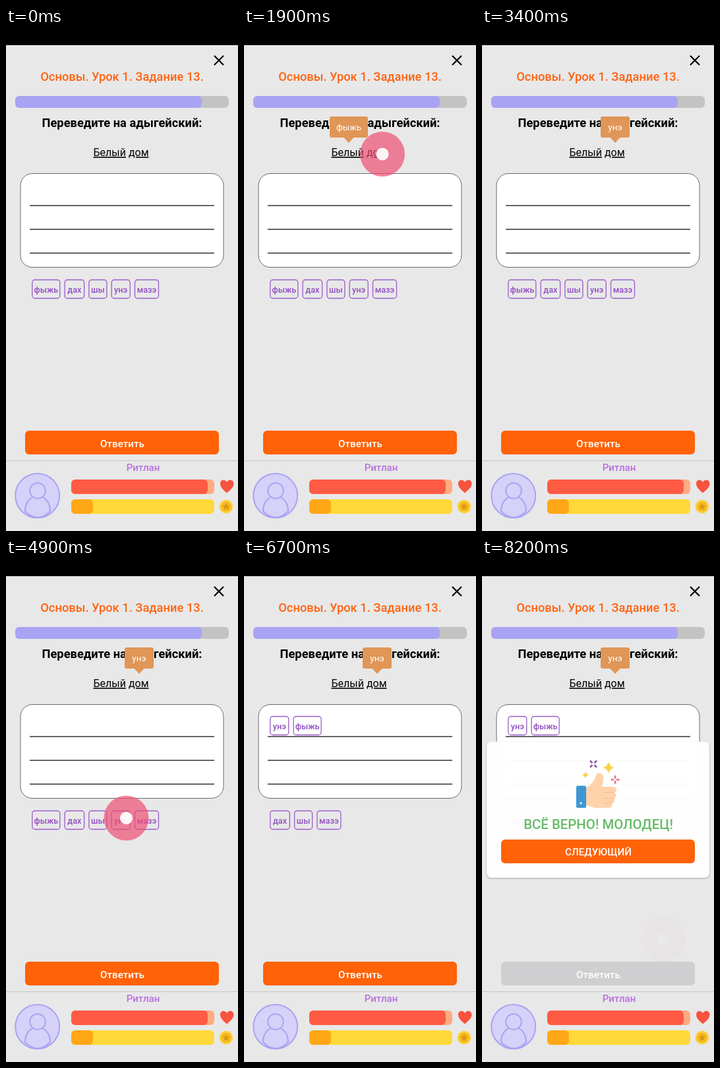
Recreate the animation shown at these times as an HTML page. Size 352x762 px, loop 8300 ms.

```html
<!DOCTYPE html>
<html lang="ru">
<head>
<meta charset="utf-8">
<title>Урок</title>
<style>
html, body { margin: 0; width: 100%; height: 100%; overflow: hidden; background: #e8e8e8; }
svg { display: block; width: 100vw; height: 100vh; }
text { font-family: Roboto, "Noto Sans", sans-serif; text-anchor: middle; font-weight: 500; }
.chip rect { fill: none; stroke: #9a5cc8; stroke-width: 1.3; }
.chip text { fill: #924fc4; font-size: 12.7px; }
.tip text { fill: #fff; font-size: 13.5px; font-weight: 400; }
</style>
</head>
<body>
<svg viewBox="0 0 352 762">
  <rect width="352" height="762" fill="#e8e8e8"/>
  <rect width="352" height="26"/>
  <path d="M316 42l14 14m0-14l-14 14" stroke="#000" stroke-width="2.2"/>
  <text x="176" y="80" font-size="18.3" fill="#ff6412">Основы. Урок 1. Задание 13.</text>
  <rect x="14" y="103" width="324" height="18" rx="6" fill="#c3c3c3"/>
  <rect x="14" y="103" width="283" height="18" rx="6" fill="#a9a3f3"/>
  <text x="176" y="150" font-size="18.3" style="font-weight:700">Переведите на адыгейский:</text>
  <text x="174.5" y="194" font-size="16" style="font-weight:400"><tspan text-decoration="underline">Белый</tspan> <tspan text-decoration="underline">дом</tspan></text>
  <rect x="22" y="220.5" width="308" height="142" rx="18" fill="#fff" stroke="#6a6a70"/>
  <path d="M36 269h280M36 305h280M36 341h280" stroke="#333" stroke-width="1.4"/>

  <rect id="answer" x="29" y="610" width="294" height="36" rx="6"/>
  <text x="176.5" y="635" font-size="15.2" fill="#fff">Ответить</text>
  <path d="M0 655.5h352" stroke="#c6c6c8"/>
  <text x="208" y="671" font-size="15" fill="#b86fe0">Ритлан</text>

  <g fill="#d5d1f8" stroke="#a9a3f3" stroke-width="2">
    <circle cx="47.7" cy="708.5" r="33.5"/>
    <path d="M40 711C33 715 29 723 29 732Q38 741.5 48 741.5T67 732C67 723 63 715 56 711"/>
    <circle cx="48" cy="701" r="11.8"/>
  </g>
  <rect x="99" y="684" width="217" height="22" rx="6" fill="#ffab82"/>
  <rect x="99" y="684" width="207" height="22" rx="6" fill="#ff5a43"/>
  <rect x="99" y="714" width="217" height="22" rx="6" fill="#ffd83a"/>
  <rect x="99" y="714" width="33" height="22" rx="6" fill="#ffa715"/>
  <path d="M335 704.5C331 701 325 696 325 690.5C325 684 332 683 335 688C338 683 345.5 684 345.5 690.5C345.5 696 339 701 335 704.5z" fill="#f8533f"/>
  <circle cx="334" cy="725" r="10.3" fill="#fdd13a"/>
  <circle cx="334" cy="725" r="7.8" fill="#f5bc26"/>
  <path d="M334 719l1.8 4 4.2.4-3.2 2.8 1 4.2-3.8-2.3-3.8 2.3 1-4.2-3.2-2.8 4.2-.4z" fill="#dc9a14"/>

  <g id="live"></g>

  <g id="modal">
    <rect x="7" y="277.5" width="338" height="206.5" rx="7" fill="none" stroke="#000" stroke-opacity=".14" stroke-width="2"/>
    <rect x="7" y="276.5" width="338" height="206" rx="7" fill="#fff" fill-opacity=".97"/>
    <path d="M157 347C164 344 170 337 173 328C174 323 182 323 184 329C185 334 183 341 182 345H199C205 345 205.5 353 201 354C205 356 204 362 200 362.5C203 365 201 370 197 370C199 374 196 377 192 377H172Q164 376 157 372z" fill="#fed3ac"/>
    <path d="M184 354h17M184 362.5h16M184 370h13" stroke="#f3b98c" stroke-width="1.2"/>
    <rect x="143" y="343.5" width="15" height="33.5" rx="2" fill="#3e97d3"/>
    <circle cx="150" cy="370" r="1.8" fill="#d5eaf8"/>
    <path d="M192 307Q193.5 314.5 201 316Q193.5 317.5 192 325Q190.5 317.5 183 316Q190.5 314.5 192 307zM157 321.5Q158 326 162.5 327Q158 328 157 332.5Q156 328 151.5 327Q156 326 157 321.5z" fill="#f8d348"/>
    <path d="M164 305.5l3.5 3.5m3 3l3.5 3.5m0-10l-3.5 3.5m-3 3l-3.5 3.5" stroke="#8c5aa8" stroke-width="2.6"/>
    <path d="M202 328v4.5m0 3.5v4.5m-6.3-6.3h4.5m3.5 0h4.8" stroke="#f0708c" stroke-width="2.6"/>
    <text x="176.5" y="409" font-size="20.4" fill="#66bb66">ВСЁ ВЕРНО! МОЛОДЕЦ!</text>
    <rect x="29" y="425" width="294" height="36" rx="6" fill="#ff6207"/>
    <text x="176.5" y="449" font-size="15.2" fill="#fff">СЛЕДУЮЩИЙ</text>
  </g>
  <g id="touch">
    <circle r="34" fill="#ef4c70" fill-opacity=".68"/>
    <circle r="9.5" fill="#fff" fill-opacity=".93"/>
  </g>
</svg>
<script>
const LOOP = 8300, STEP = 100;
const widths = { фыжь: 42, дах: 29.5, шы: 27, унэ: 28, мазэ: 36 };
const picks = [['унэ', 5200], ['фыжь', 6200]];
// start, end of hold, end of fade, x, y
const taps = [
  [800, 850, 1000, 158, 190],
  [1800, 2340, 2400, 210, 191],
  [4900, 5340, 5400, 182.5, 392.5],
  [6000, 6340, 6400, 70, 396],
  [7000, 7120, 7245, 191.5, 617],
  [7900, 8050, 8206, 275, 577]
];
const el = id => document.getElementById(id);
const clamp = v => Math.max(0, Math.min(1, v));

function chipRow(words, y) {
  let x = 39.8;
  return words.map(word => {
    const w = widths[word];
    const chip = `<g class="chip" transform="translate(${x} ${y})"><rect width="${w}" height="28" rx="4"/>` +
      `<text x="${w / 2}" y="19.5">${word}</text></g>`;
    x += w + 7.3;
    return chip;
  }).join('');
}

function tooltip(word, x, width, age) {
  const scale = 1 - Math.exp(-age / 36) * Math.cos(age * Math.PI / 100);
  return `<g class="tip" transform="translate(${x} 150) scale(${scale})" fill="#e09657">
    <rect x="${-width / 2}" y="-16" width="${width}" height="32" rx="3"/>
    <path d="M-8 15.5h16L0 24z"/><text y="4.5">${word}</text></g>`;
}

function draw(t) {
  const chosen = picks.filter(p => t >= p[1]).map(p => p[0]);
  const left = Object.keys(widths).filter(w => !chosen.includes(w));
  let live = chipRow(left, 381.5) + chipRow(chosen, 238.5);
  if (t >= 2000) live += tooltip('унэ', 202, 44, t - 2000);
  else if (t >= 900) live += tooltip('фыжь', 159, 58, t - 900);
  el('live').innerHTML = live;

  const shown = clamp((t - 7050) / 120);
  el('modal').setAttribute('opacity', shown);
  el('answer').setAttribute('fill', shown ? '#cfcfd1' : '#ff6207');

  const tap = taps.find(p => t >= p[0] && t < p[2]);
  el('touch').setAttribute('opacity', tap ? clamp((tap[2] - t) / (tap[2] - tap[1])) : 0);
  if (tap) el('touch').setAttribute('transform', `translate(${tap[3]} ${tap[4]})`);
}

const begin = performance.now();
function tick() {
  const t = (performance.now() - begin) % LOOP;
  draw(Math.floor(t / STEP) * STEP);
  requestAnimationFrame(tick);
}
tick();
</script>
</body>
</html>
```
